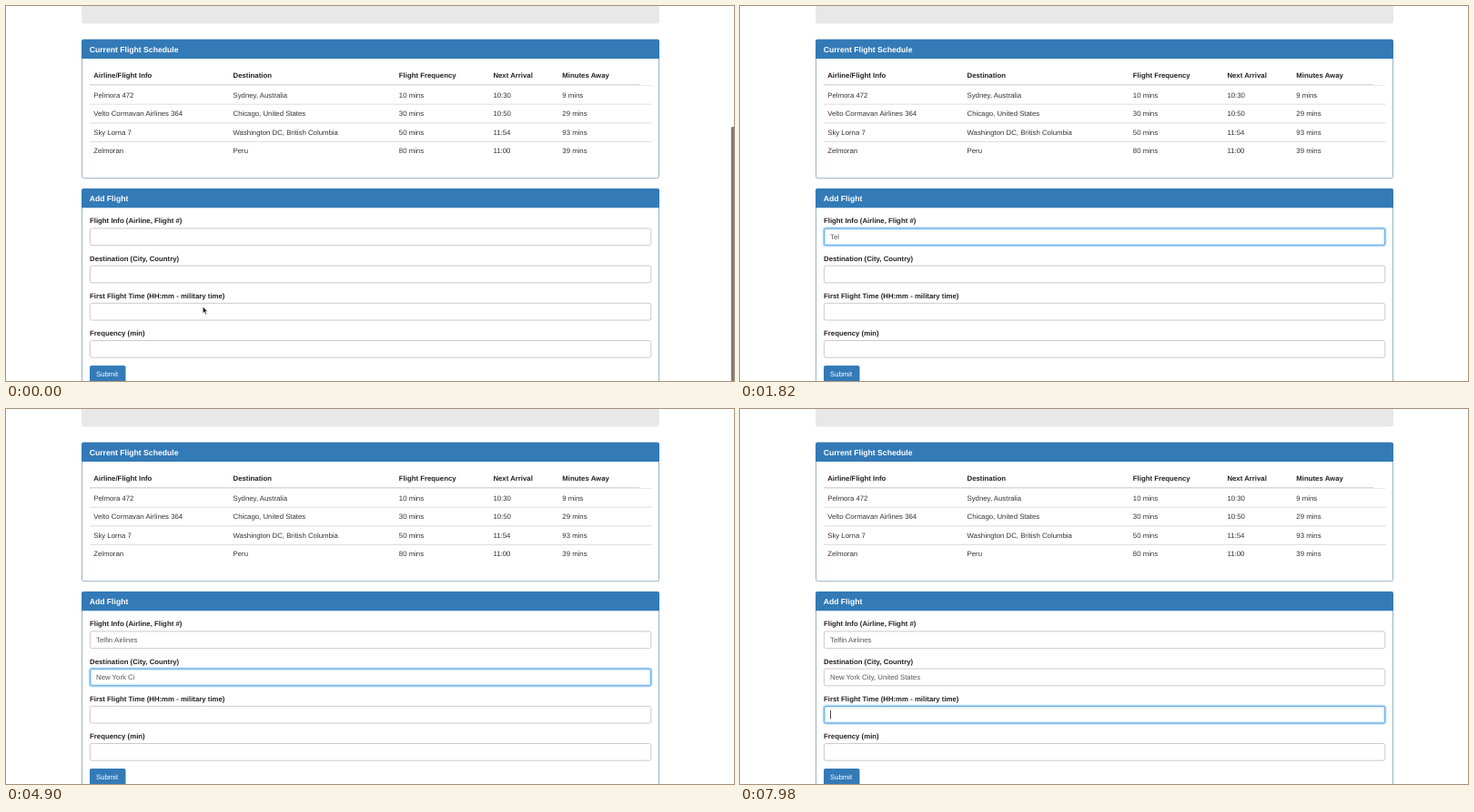
Animation, 800 px wide and 413 px high, one loop 8000 ms. Source, as an HTML page:

```html
<!DOCTYPE html>
<html lang="en">
<head>
<meta charset="utf-8">
<title>Flight schedule</title>
<style>
  html, body { margin: 0; width: 100%; height: 100%; overflow: hidden; background: #fff; }
  svg { display: block; width: 800px; height: 413px; }
  text { font: 7.8px "Liberation Sans", Arial, sans-serif; fill: #333; white-space: pre; text-rendering: geometricPrecision; }
  .bold { font-weight: bold; fill: #222; }
  .title { font-size: 8.65px; font-weight: bold; fill: #fff; }
  .light { fill: #fff; }
  .typed { fill: #555; }
  .glow { fill: none; stroke: #66afe9; }
</style>
</head>
<body>
<svg id="stage" viewBox="0 0 800 413"></svg>
<script>
const LOOP = 8000, STEP = 70, BLUE = '#337ab7';
const stage = document.getElementById('stage');

function add(tag, attrs, content = '', parent = stage) {
  const node = document.createElementNS('http://www.w3.org/2000/svg', tag);
  for (const key in attrs) node.setAttribute(key, attrs[key]);
  node.textContent = content;
  return parent.appendChild(node);
}
const rect = (x, y, width, height, fill, more) => add('rect', { x, y, width, height, fill, ...more });
const label = (x, y, content, style = '') => add('text', { x, y, class: style }, content);
const clamp = v => Math.max(0, Math.min(1, v));
const ease = v => v * v * (3 - 2 * v);

function panel(y, height, title) {
  rect(83.5, y + .5, 634, height, '#fff', { rx: 2, stroke: '#8fa9c2', 'stroke-width': .9 });
  add('path', { d: `M83 ${y + 21.3}v-19q0-2.3 2-2.3h631q2 0 2 2.3v19z`, fill: BLUE });
  label(91.7, y + 14, title, 'title');
}

rect(83, -10, 635, 29.5, '#e8e8e8', { rx: 3 });

panel(36.7, 152.5, 'Current Flight Schedule');
const columns = [96.2, 249.5, 431.8, 535.4, 611.3];
const rows = [
  ['Airline/Flight Info', 'Destination', 'Flight Frequency', 'Next Arrival', 'Minutes Away'],
  ['Pelmora 472', 'Sydney, Australia', '10 mins', '10:30', '9 mins'],
  ['Velto Cormavan Airlines 364', 'Chicago, United States', '30 mins', '10:50', '29 mins'],
  ['Sky Lorna 7', 'Washington DC, British Columbia', '50 mins', '11:54', '93 mins'],
  ['Zelmoran', 'Peru', '80 mins', '11:00', '39 mins'],
];
rows.forEach((cells, r) => {
  const y = r ? 100.5 + (r - 1) * 20.65 : 79.2;
  cells.forEach((cell, c) => label(columns[c], y, cell, r ? '' : 'bold'));
  if (r > 1) rect(92, y - 13.5, 617.5, 1, '#ddd');
});
rect(92, 86, 604, 1, '#d8d8d8');
rect(92, 87, 617.5, .6, '#ddd');

panel(200.9, 230, 'Add Flight');

// keys: [time, characters typed], linear in between
const fields = [
  { name: 'Flight Info (Airline, Flight #)', text: 'Telfin Airlines', focus: 620, blur: 2950,
    keys: [[1300, 1], [1810, 3], [2800, 15]] },
  { name: 'Destination (City, Country)', text: 'New York City, United States', focus: 2950, blur: 6700,
    keys: [[4000, 1], [4880, 11], [6000, 23], [6460, 28]] },
  { name: 'First Flight Time (HH:mm - military time)', text: '', focus: 6700, blur: LOOP + 1, keys: [] },
  { name: 'Frequency (min)', text: '', focus: Infinity, blur: Infinity, keys: [] },
];
fields.forEach((field, i) => {
  const y = 244.9 + i * 41.2;
  const box = { x: 92.4, y, width: 616.4, height: 18.7, rx: 2 };
  field.top = y;
  label(92, y - 5.6, field.name, 'bold');
  add('rect', { ...box, fill: '#fff', stroke: '#c6c6c6', 'stroke-width': .9 });
  field.glow = add('g', { class: 'glow' });
  [[4.4, .16], [2.6, .22], [1, 1]].forEach(([width, opacity]) =>
    add('rect', { ...box, 'stroke-width': width, 'stroke-opacity': opacity }, '', field.glow));
  field.typed = label(99, y + 12.1, '', 'typed');
  field.caret = rect(99, y + 4.8, .9, 9.2, '#333');
});

rect(92, 396, 39.5, 24, BLUE, { rx: 2 });
label(99, 408, 'Submit', 'light');

const scrollbar = rect(796.8, 133, 4, 284, '#7d7d7d', { rx: 1.5 });
const arrow = add('path', {
  d: 'M0 0V7.6L1.7 6.1 3 9 4.3 8.4 3.1 5.6H5.4Z', fill: '#222', stroke: '#fff', 'stroke-width': .6,
});
const beam = add('path', {
  d: 'M-1.7-4Q0-4 0-3Q0-4 1.7-4M0-3V3M-1.7 4Q0 4 0 3Q0 4 1.7 4M-.8 .8H.8',
  fill: 'none', stroke: '#333', 'stroke-width': .8,
});
const show = (node, visible) => node.setAttribute('visibility', visible ? 'visible' : 'hidden');

function typedCount(keys, t) {
  if (!keys.length || t < keys[0][0]) return 0;
  const next = keys.findIndex(([time]) => time > t);
  if (next < 0) return keys[keys.length - 1][1];
  const [t0, n0] = keys[next - 1], [t1, n1] = keys[next];
  return Math.floor(n0 + (n1 - n0) * (t - t0) / (t1 - t0));
}

function drawField(field, t) {
  const { focus, blur, keys } = field;
  const count = typedCount(keys, t);
  field.typed.textContent = field.text.slice(0, count);
  field.glow.setAttribute('opacity', clamp((t - focus) / 150) - clamp((t - blur) / 150) || 0);
  const blinkStart = count ? keys[0][0] : focus;
  show(field.caret, t >= focus && t < blur && (t - blinkStart) % 1000 < 500);
  field.caret.setAttribute('x', 99 + (count ? field.typed.getComputedTextLength() : 0));
}

function drawPointer(t) {
  const p = ease(clamp((t - 70) / 450));
  const x = 216.2 - 65.6 * p, y = 330.8 - 79.8 * p;
  const overInput = p > 0 && fields.some(f => y > f.top && y < f.top + 18.7);
  const visible = t < fields[0].keys[0][0];
  show(arrow, visible && !overInput);
  show(beam, visible && overInput);
  for (const node of [arrow, beam]) node.setAttribute('transform', `translate(${x} ${y})`);
}

function frame(now) {
  const t = Math.floor(now % LOOP / STEP) * STEP;
  fields.forEach(field => drawField(field, t));
  drawPointer(t);
  scrollbar.setAttribute('opacity', 1 - clamp((t - 140) / 280));
  requestAnimationFrame(() => frame(performance.now() - start));
}
const start = performance.now();
frame(0);
</script>
</body>
</html>
```
